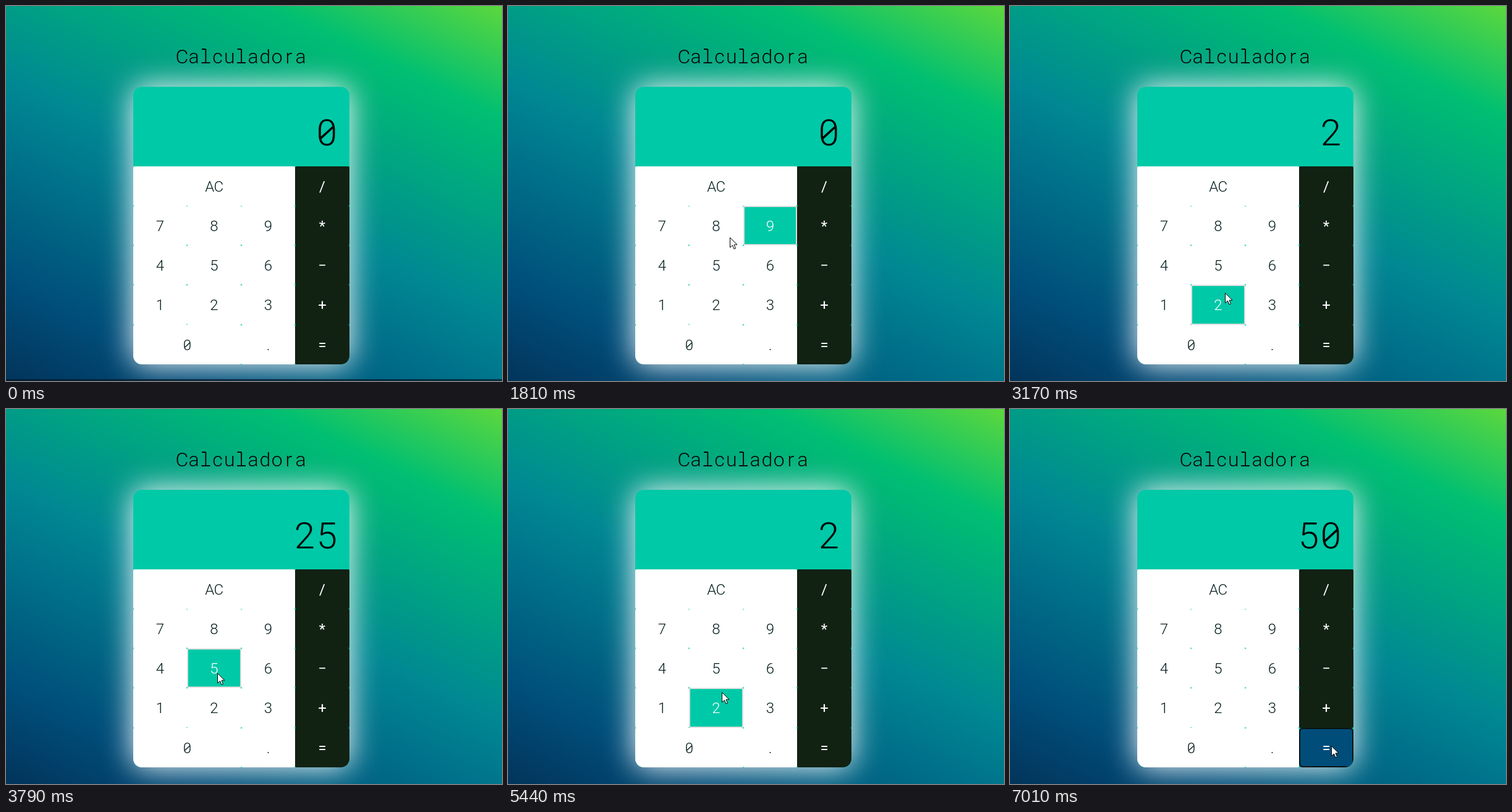
An HTML page with a canvas that plays this animation: 803 by 608 pixels, repeating every 8 s.

```html
<!DOCTYPE html>
<html lang="es">
<head>
<meta charset="utf-8">
<title>Calculadora</title>
<style>
html, body { margin: 0; width: 100%; height: 100%; overflow: hidden; }
canvas {
  display: block;
  background: linear-gradient(to right top, #051937, #004d7a, #008793, #00bf72, #a8eb12) -302px -22px / 1366px 657px;
}
</style>
</head>
<body>
<canvas id="stage" width="803" height="608"></canvas>
<script>
const ctx = document.getElementById('stage').getContext('2d');
const LOOP = 8000, HOVER_LAG = 90, BAR_END = 1700;
const TEAL = '#00c9a7', LEFT = 206, TOP = 131, COL = 87.5, ROW = 450 / 7;
const colX = c => Math.floor(LEFT + c * COL);
const rowY = r => Math.round(TOP + (r + 2) * ROW);

// Repeated letters make one wide key
const keys = ['AAA/', '789*', '456−', '123+', '00.='].flatMap((row, r) =>
  [...new Set(row)].map(ch => {
    const first = row.indexOf(ch), x = colX(first), y = rowY(r);
    return {
      label: ch === 'A' ? 'AC' : ch, dark: first === 3, x, y,
      w: colX(row.lastIndexOf(ch) + 1) - x, h: rowY(r + 1) - y
    };
  }));

const display = [[0, '0'], [3030, '2'], [3720, '25'], [5300, '2'], [5780, '25'], [6880, '50']];

// Pointer moves: start, end, goal and an optional point that bends the way
const START = [768, 601];
const moves = [
  [520, 660, [738, 604]],
  [660, 1460, [633, 572]],
  [1460, 2220, [240, 436], [450, 260]],
  [2220, 2770, [348, 465], [263, 475]],
  [3230, 3600, [342, 428]],
  [3860, 4280, [517, 478]],
  [4400, 5100, [346, 459]],
  [5440, 5580, [342, 436]],
  [5780, 6480, [520, 546]]
];
const pointerShown = t => t >= 1460 || t >= 520 && t < 660;

function pointer(t) {
  let at = START;
  for (const [start, end, goal, bend] of moves) {
    if (t < start) break;
    const rest = (1 - Math.min(1, (t - start) / (end - start))) ** 2, k = 1 - rest;
    at = at.map((a, i) => {
      const mid = bend ? bend[i] : (a + goal[i]) / 2;
      return rest * rest * a + 2 * rest * k * mid + k * k * goal[i];
    });
  }
  return at;
}

function box(x, y, w, h, r, color) {
  ctx.fillStyle = color;
  ctx.beginPath();
  ctx.roundRect(x, y, w, h, r);
  ctx.fill();
}

// Strokes, in em, that turn plain glyphs into their monospace forms
const extras = {
  '0': [[-0.17, -0.19, 0.17, -0.5]],
  l: [[-0.22, -0.03, 0.22, -0.03], [-0.2, -0.72, 0, -0.72]]
};

function text(str, x, y, size, color, weight = 300) {
  ctx.font = `${weight} ${size}px Roboto, sans-serif`;
  ctx.textAlign = 'center';
  ctx.fillStyle = ctx.strokeStyle = color;
  ctx.lineWidth = size * 0.06;
  [...str].forEach((ch, i) => {
    const cx = x + (i - (str.length - 1) / 2) * size * 0.6;
    ctx.fillText(ch, cx, y);
    for (const [x1, y1, x2, y2] of extras[ch] || []) {
      ctx.beginPath();
      ctx.moveTo(cx + x1 * size, y + y1 * size);
      ctx.lineTo(cx + x2 * size, y + y2 * size);
      ctx.stroke();
    }
  });
}

function drawKey({ label, x, y, w, h, dark }, hover) {
  box(x, y, w, h, dark && hover ? 5 : 2, !dark ? hover ? '#dcdfdf' : '#fff' : hover ? '#0a1214' : '#112213');
  if (hover) box(x + 2, y + 2, w - 4, h - 4, dark ? 4 : 0, dark ? '#004d7a' : TEAL);
  text(label, x + w / 2, y + 41, 24, dark || hover ? '#fff' : '#041c1c', dark ? 400 : 300);
}

function drawPointer(x, y) {
  ctx.save();
  ctx.translate(Math.round(x) + 0.5, Math.round(y) + 0.5);
  ctx.lineWidth = 1;
  ctx.fillStyle = '#fff';
  ctx.strokeStyle = '#000';
  const arrow = new Path2D('M0 0V16L4 12.5L6.5 18.5L9 17.5L6.5 11.5H11.5Z');
  ctx.fill(arrow);
  ctx.stroke(arrow);
  ctx.restore();
}

function draw(t) {
  ctx.clearRect(0, 0, 803, 608);
  text('Calculadora', 381, 93, 32, '#000');

  ctx.save();
  ctx.shadowColor = '#fff';
  ctx.shadowBlur = 50;
  box(LEFT, TOP, 350, 450, 14, TEAL);
  ctx.restore();

  const [ax, ay] = pointer(t - HOVER_LAG);
  ctx.save();
  ctx.clip();
  for (const k of keys) {
    drawKey(k, ax >= k.x && ax < k.x + k.w && ay >= k.y && ay < k.y + k.h);
  }
  ctx.restore();

  const shown = display.findLast(d => d[0] <= t)[1];
  text(shown, 537.5 - shown.length * 18, 226, 60, '#000');

  if (pointerShown(t)) drawPointer(...pointer(t));
  if (t < BAR_END) {
    ctx.fillStyle = 'rgba(6, 26, 42, .75)';
    ctx.fillRect(0, 605, 803, 3);
  }
}

function frame(now) {
  draw(now % LOOP);
  requestAnimationFrame(frame);
}
requestAnimationFrame(frame);
</script>
</body>
</html>
```
